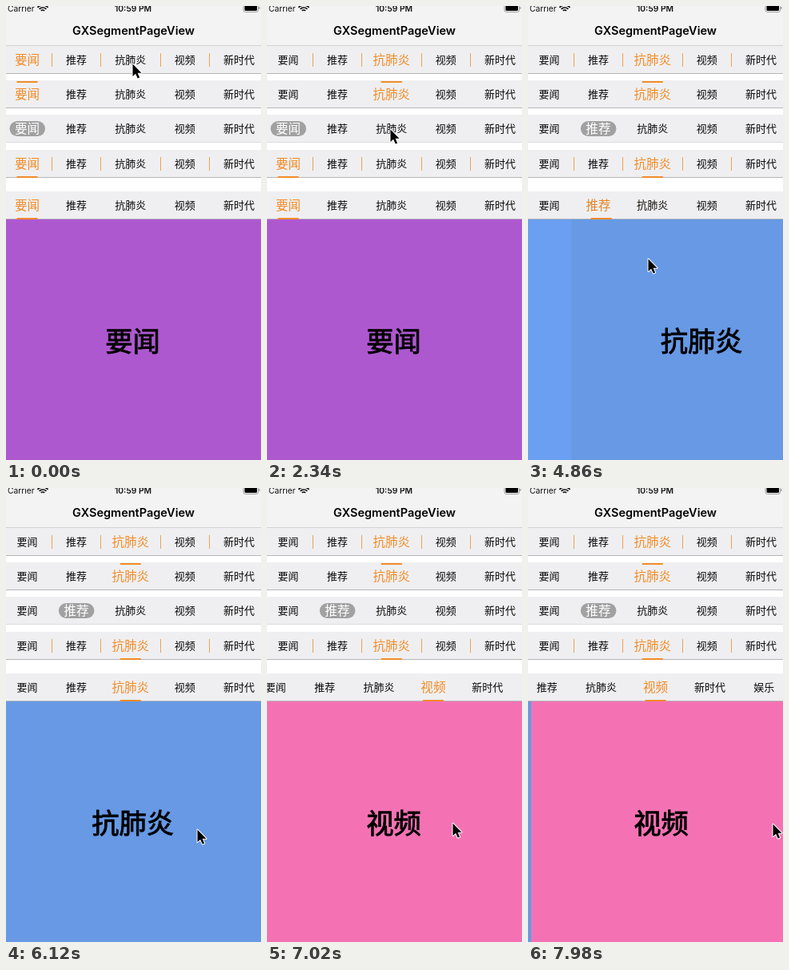
Write an HTML page with a canvas that moves like this. It is 319x568 px and loops after 8 s.

```html
<!DOCTYPE html>
<html lang="zh">
<head>
<meta charset="utf-8">
<title>GXSegmentPageView</title>
<style>
html, body { margin: 0; width: 100%; height: 100%; overflow: hidden; background: #fff; }
canvas { display: block; }
</style>
</head>
<body>
<canvas id="stage" width="319" height="568"></canvas>
<script>
const ctx = document.getElementById('stage').getContext('2d');
const WIDTH = 319, HEIGHT = 568, LOOP = 8000, STEP = 60;
const PAGE_TOP = 267, SWIPE = 420, BAR_TIME = 280;
const FONT_SIZE = 13, GAP = 35.4;
const CJK = '"Noto Sans CJK SC", "Noto Sans CJK", sans-serif';
const LATIN = 'Inter, sans-serif';
const ORANGE = [242, 140, 40], BLACK = [8, 8, 8], WHITE = [255, 255, 255];

const lerp = (a, b, u) => a + (b - a) * u;
const clamp = u => Math.min(1, Math.max(0, u));
const smooth = u => u * u * (3 - 2 * u);
const easeOut = u => 1 - (1 - u) ** 2;
const during = (t, start, length) => clamp((t - start) / length);

// Items are laid out one after another with an equal gap.
let nextLeft = 13.5;
const items = ['要闻', '推荐', '抗肺炎', '视频', '新时代', '娱乐'].map(label => {
  const left = nextLeft, width = label.length * FONT_SIZE;
  nextLeft += width + GAP;
  return { label, left, center: left + width / 2 };
});
const pageColors = ['#ae58d0', '#6b9ff1', '#6799e5', '#f472b4'];

const tapTime = i => 180 + 1083 * i;
const swipes = [{ start: 3900, y: 317 }, { start: 4620, y: 316 }, { start: 6460, y: 421 }];

const tap = (i, target) => [{ start: tapTime(i), target }];
const rows = [
  { y: 50, separators: true, moves: tap(0, 2) },
  { y: 93, bar: 1, moves: tap(1, 2) },
  { y: 136, pill: true, moves: tap(2, 1) },
  { y: 180, bar: 33, separators: true, moves: tap(3, 2) },
  { y: 232, bar: 33, moves: swipes.map(({ start }, i) => ({ start: start + 200, target: i + 1 })) }
];

// The pointer rests on each tapped row, then drags the pages.
const pointerKeys = [
  ...[0, 1, 2, 3].flatMap(i =>
    [-200, 260].map(dt => [tapTime(i) + dt * (i < 3 ? 1 : 0.2), 158 - 2 * i, 72 + 41 * i])),
  [3720, 165, 239],
  ...swipes.flatMap(({ start, y }) => [[start, 235, y], [start + 240, 150, y]]),
  [6120, 239, 427], [7020, 232, 419], [7980, 306, 420]
].sort((a, b) => a[0] - b[0]);

function rect(x, y, w, h, color) {
  ctx.fillStyle = color;
  ctx.fillRect(x, y, w, h);
}

function roundRect(x, y, w, h, r) {
  ctx.beginPath();
  ctx.roundRect(x, y, w, h, r);
}

function text(str, x, y, font, color, align = 'center') {
  ctx.font = font;
  ctx.fillStyle = color;
  ctx.textAlign = align;
  ctx.fillText(str, x, y);
}

function drawHeader() {
  rect(0, 0, WIDTH, 50, '#f3f3f4');
  rect(0, 49, WIDTH, 1, '#d2d2d4');
  text('Carrier', 2, 7, '10.3px ' + LATIN, '#111', 'left');
  text('10:59 PM', 159, 7, '600 10.3px ' + LATIN, '#111');
  text('GXSegmentPageView', 159.5, 36, '600 14.5px ' + LATIN, '#000');

  ctx.strokeStyle = '#111';
  ctx.lineWidth = 1.7;
  for (const radius of [3, 6, 9]) {
    ctx.beginPath();
    ctx.arc(46, 8, radius, -Math.PI * 0.76, -Math.PI * 0.24);
    ctx.stroke();
  }

  ctx.lineWidth = 0.8;
  ctx.strokeStyle = '#888';
  roundRect(297, -2, 18.5, 9.5, 2.5);
  ctx.stroke();
  ctx.fillStyle = '#000';
  roundRect(298.5, -1, 15.5, 7, 1.5);
  ctx.fill();
  rect(316.5, 1, 1, 3, '#888');
}

function selection(moves, t) {
  const index = moves.findLastIndex(m => t >= m.start);
  const target = index < 0 ? 0 : moves[index].target;
  const origin = index < 1 ? 0 : moves[index - 1].target;
  const progress = index < 0 ? 1 : smooth(during(t, moves[index].start, BAR_TIME));
  return { origin, target, progress };
}

function drawRow(row, t) {
  const { origin, target, progress } = selection(row.moves, t);
  const center = lerp(items[origin].center, items[target].center, progress);
  const highlight = row.pill ? WHITE : ORANGE;

  rect(0, row.y, WIDTH, 34, '#efeff1');
  rect(0, row.y + 34, WIDTH, 1, row.pill ? '#dcdcde' : '#b6b6b8');
  ctx.save();
  ctx.translate(-row.scroll || 0, row.y);
  if (row.separators) {
    for (const { left } of items.slice(1, 5)) rect(Math.round(left - GAP / 2 - 0.5), 9, 1, 17, '#f0a050');
  }
  if (row.pill) {
    ctx.fillStyle = '#a1a1a1';
    roundRect(center - 22, 8, 44.5, 19, 9.5);
    ctx.fill();
  }
  items.forEach((item, i) => {
    const amount = i === target ? progress : i === origin ? 1 - progress : 0;
    const color = BLACK.map((c, k) => Math.round(lerp(c, highlight[k], amount)));
    const size = FONT_SIZE * lerp(1, 1.2, amount);
    text(item.label, item.center, 16.9 + size * 0.37, `${size}px ${CJK}`, `rgb(${color})`);
  });
  if (row.bar) rect(center - 13, row.bar, 26, 2, '#f28c28');
  ctx.restore();
}

function pagePosition(t) {
  const swiped = swipes.reduce((sum, { start }) => sum + easeOut(during(t, start, SWIPE)), 0);
  return swiped - 8 / WIDTH * easeOut(during(t, 7800, 180));
}

function drawPages(t) {
  const position = pagePosition(t);
  ctx.save();
  ctx.beginPath();
  ctx.rect(0, PAGE_TOP, WIDTH, HEIGHT - PAGE_TOP);
  ctx.clip();
  for (let i = Math.floor(position); i <= Math.ceil(position); i++) {
    const x = (i - position) * WIDTH;
    // The incoming page's background leads its label slightly.
    rect(x > 0 ? Math.max(0, x - 4) : x, PAGE_TOP, WIDTH + 4, HEIGHT, pageColors[i]);
    text(items[i].label, x + 158.6, 432, `500 34.3px ${CJK}`, '#000');
    ctx.strokeStyle = '#000';
    ctx.lineWidth = 0.9;
    ctx.strokeText(items[i].label, x + 158.6, 432);
  }
  ctx.restore();
}

function drawPointer(t) {
  const next = Math.max(1, pointerKeys.findIndex(key => key[0] > t));
  const [from, to] = pointerKeys.slice(next - 1, next + 1);
  const u = smooth(during(t, from[0], to[0] - from[0]));
  const arrow = new Path2D('M0 0V15.5L3.6 12.2L6.2 18L8.6 17L6.1 11.2H11Z');
  ctx.save();
  ctx.translate(lerp(from[1], to[1], u) + 0.5, lerp(from[2], to[2], u) + 0.5);
  ctx.strokeStyle = '#fff';
  ctx.lineWidth = 2;
  ctx.lineJoin = 'round';
  ctx.stroke(arrow);
  ctx.fillStyle = '#000';
  ctx.fill(arrow);
  ctx.restore();
}

function draw(now) {
  const t = Math.floor((now % LOOP) / STEP) * STEP;
  // After the last swipe the bottom row scrolls its selected item to the middle.
  rows[4].scroll = smooth(during(t, swipes[2].start + 460, 310)) * (items[3].center - WIDTH / 2);

  rect(0, 0, WIDTH, HEIGHT, '#fff');
  drawHeader();
  drawPages(t);
  rows.forEach(row => drawRow(row, t));
  drawPointer(t);
  requestAnimationFrame(draw);
}

// The last key is reached exactly at the final step, so hold it until the loop ends.
pointerKeys.push([LOOP, ...pointerKeys.at(-1).slice(1)]);
requestAnimationFrame(draw);
</script>
</body>
</html>
```
